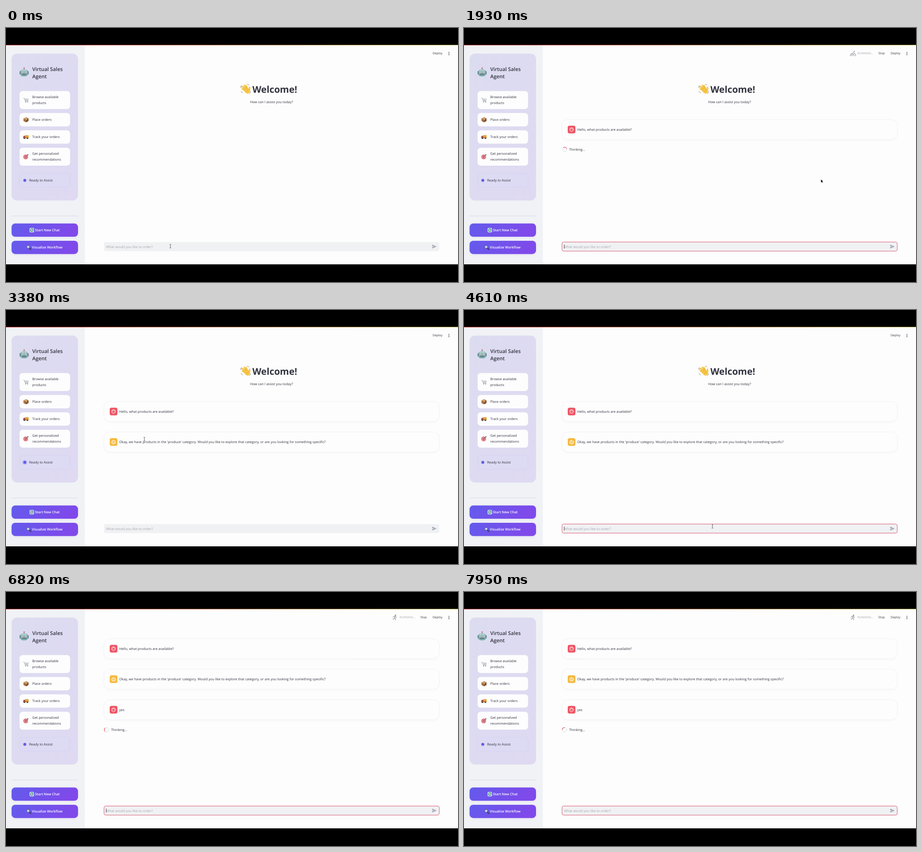
An HTML page that plays this animation: 998 by 561 pixels, repeating every 7990 ms.

```html
<!DOCTYPE html>
<html lang="en">
<head>
<meta charset="utf-8">
<title>Virtual Sales Agent</title>
<style>
  html, body { margin: 0; width: 100%; height: 100%; overflow: hidden; background: #000; }
  svg { display: block; width: 100vw; height: 100vh; }
  text { font: 7.44px "Open Sans", "Noto Sans", sans-serif; fill: #31333f; text-rendering: geometricPrecision; white-space: pre; }
  .title { font-size: 11.3px; font-weight: 600; }
  .hero { font-size: 20.45px; font-weight: 700; }
  .btn { font-size: 7.5px; font-weight: 600; fill: #fff; }
  .bar { font-size: 6.65px; }
  .line { fill: none; stroke-linecap: round; stroke-linejoin: round; }
</style>
</head>
<body>
<svg viewBox="0 0 998 561" preserveAspectRatio="none">
  <defs>
    <linearGradient id="rainbow"><stop stop-color="#ff4b4b"/><stop offset="1" stop-color="#fffd80"/></linearGradient>
    <linearGradient id="panel" x2="1" y2="1"><stop stop-color="#dcdcf0"/><stop offset="1" stop-color="#dfd9f2"/></linearGradient>
    <linearGradient id="violet" x2="1" y2=".2"><stop stop-color="#635bec"/><stop offset="1" stop-color="#8049ea"/></linearGradient>
    <filter id="soft" x="-10%" y="-30%" width="120%" height="180%"><feGaussianBlur stdDeviation="2.5"/></filter>
    <clipPath id="page"><rect x="174" y="38" width="824" height="484"/></clipPath>

    <g id="robot">
      <path d="M10 2v4" stroke="#7d8f96" stroke-width="1.2"/><circle cx="10" cy="2" r="1.4" fill="#c9665c"/>
      <path d="M0 10.5q0-2 2-2h16q2 0 2 2v4q0 2-2 2H2q-2 0-2-2z" fill="#5d868b"/>
      <path d="M2 10q0-5 8-5t8 5v6q0 4.5-8 4.500T2 16z" fill="#82b0b3"/>
      <path d="M4 8q1-2.300 6-2.300T16 8z" fill="#b3d2d2"/>
      <circle cx="6.600" cy="10.500" r="2.200" fill="#eaf4ef"/><circle cx="13.400" cy="10.500" r="2.200" fill="#eaf4ef"/>
      <circle cx="6.600" cy="10.500" r="1.100" fill="#3d5257"/><circle cx="13.400" cy="10.500" r="1.100" fill="#3d5257"/>
      <path d="M9 13.400l1-1.800 1 1.800z" fill="#d0604f"/><rect x="5.500" y="14.800" width="9" height="2.700" rx="1.200" fill="#3e5157"/>
      <path d="M7.700 14.800v2.700M10 14.800v2.700M12.300 14.800v2.700" stroke="#dfe9e6" stroke-width=".7"/>
    </g>
    <g id="cart">
      <path class="line" d="M.6 1.800h1.800l2.200 6.800h6" stroke="#8b9197" stroke-width=".8"/>
      <path d="M3 3.300h8.800l-1.300 4H4.300z" fill="#dfe2e5" stroke="#a1a7ad" stroke-width=".5"/>
      <path d="M5.500 3.300l.6 4M7.700 3.300v4M9.900 3.300l-.6 4" stroke="#a1a7ad" stroke-width=".5"/>
      <circle cx="5.400" cy="10.300" r=".9" fill="#5d6268"/><circle cx="10" cy="10.300" r=".9" fill="#5d6268"/>
    </g>
    <g id="box">
      <path d="M.6 3.200L6.500.6l5 2.400v6L6 11.800.6 9z" fill="#a87142"/><path d="M6 5.400l5.500-2.400v6L6 11.800z" fill="#7c4e2b"/>
      <path d="M.6 3.200L6.500.6l5 2.400L6 5.400z" fill="#c98f5a"/><path d="M3 2.200l5.400 2.400v2l-1.700.8v-2L1.700 2.800z" fill="#e4c08f"/>
    </g>
    <g id="truck">
      <rect x="4.600" y="2" width="7.400" height="6.200" rx=".6" fill="#e0a238"/><path d="M0 8.400V5.600l1.300-2.400h3.500v5.200z" fill="#da4a39"/>
      <path d="M.8 5.400l.9-1.500h1.600v1.500z" fill="#50656f"/><path d="M.2 8.300H12" stroke="#6b4b3a"/>
      <circle cx="2.600" cy="9" r="1.400" fill="#33363b"/><circle cx="9.300" cy="9" r="1.400" fill="#33363b"/>
    </g>
    <g id="dart">
      <circle cx="5.400" cy="6.600" r="5" fill="#cf3a44"/><circle cx="5.400" cy="6.600" r="3.700" fill="#f3e6e6"/>
      <circle cx="5.400" cy="6.600" r="2.700" fill="#cf3a44"/><circle cx="5.400" cy="6.600" r="1" fill="#f6eeee"/>
      <path d="M5.400 6.600l4.400-4.400" stroke="#4c5560"/><path d="M8.800 3l.2-2L10.600 0l.2 1.400 1.400.2-1.200 1.500z" fill="#58707f"/>
    </g>
    <g id="wave" class="line">
      <path d="M10 13L17 10.500l3.500 4q.5 6-3.500 7-3 .5-7-5z" fill="#f7c644" stroke="#f7c644" stroke-width="2"/>
      <g stroke="#f7c644" stroke-width="3.100">
        <path d="M10.500 16L4.500 11.800M11.500 13.500L5.300 6.800M14 11.800L9 4.200M16.500 11.500L13 4.600M20 15.500Q21.800 12 20.600 8.400"/>
      </g>
      <path d="M6 10.200l4.500 4M8 7.200l4.700 5.300M11.800 5.800l3.400 5.400M14 18q1.800-4.200 5-4" stroke="#d99a2b" stroke-width=".7"/>
      <path d="M1 8.800q0-2.900 2-4.600M2.900 9q.1-1.400.9-2.400M15.800 1.600q2.400.2 3.800 2.100M2 17q.8 2.600 3.600 4M22.800 17.500q.2 3-2.400 5.200" stroke="#8d7b66" stroke-width=".9"/>
    </g>
    <g id="cycle">
      <rect width="10" height="10" rx="2.500" fill="#cfdcea"/>
      <path class="line" d="M2.200 4.700a2.900 2.900 0 0 1 5.200-1.400M7.800 5.300a2.900 2.900 0 0 1-5.200 1.400" stroke="#3f8a86" stroke-width="1.400"/>
      <path d="M8.400 1.700v2.600H5.800zM1.600 8.300V5.700h2.600z" fill="#3f8a86"/>
    </g>
    <g id="lens">
      <path class="line" d="M6.500 6.500l3.300 3.300" stroke="#292b3a" stroke-width="1.700"/>
      <circle cx="4" cy="4" r="3.300" fill="#b9d4ec" stroke="#4e5667"/>
    </g>
    <g id="user">
      <rect width="17" height="17" rx="4" fill="#ef5666"/><circle class="line" cx="8.500" cy="8.600" r="4.100" stroke="#fff"/>
      <path class="line" d="M4.700 7.700q2.600 0 3.600-2.600 1.200 2.300 4.100 2.300" stroke="#fff" stroke-width=".9"/>
      <circle cx="7" cy="9.700" r=".6" fill="#fff"/><circle cx="10" cy="9.700" r=".6" fill="#fff"/>
    </g>
    <g id="bot">
      <rect width="17" height="17" rx="4" fill="#f5ba43"/><rect class="line" x="5" y="6" width="7" height="6.400" rx=".8" stroke="#fff"/>
      <path class="line" d="M8.500 6V4.200M4 8.500v1.600M13 8.500v1.600M7 10.800h3" stroke="#fff"/>
      <circle cx="7" cy="8.500" r=".7" fill="#fff"/><circle cx="10" cy="8.500" r=".7" fill="#fff"/>
    </g>
    <g id="bike" class="line" stroke="#8b8d96" stroke-width=".9">
      <circle cx="3" cy="9.300" r="2.400"/><circle cx="10.600" cy="9.300" r="2.400"/>
      <path d="M3 9.300l2.400-3.600 2.200 1.700v2.300M5.400 5.700l2.500-1.800 1.400 1.700h1.700"/><circle cx="9.300" cy="1.800" r="1"/>
    </g>
    <g id="runner" class="line" stroke="#8b8d96" stroke-width="1.100">
      <circle cx="8" cy="1.600" r="1" fill="#8b8d96"/>
      <path d="M2.800 5.800l1.500-2 2.900-.3-1 3.500 2 1.800v3M6.200 7l-1 2.200-3 .7M7.200 3.500l1.300 2 2 .4"/>
    </g>
  </defs>

  <rect width="998" height="561"/>
  <rect y="38" width="998" height="484" fill="#fdfdfd"/>
  <g clip-path="url(#page)"><g id="feed"></g></g>
  <rect x="174" y="38" width="824" height="31" fill="#fdfdfd"/>
  <g id="running">
    <use id="sport" x="852" y="50"/>
    <text class="bar" x="869" y="58.400" style="font-size:6.470px;fill:#a5a6ae">RUNNING...</text>
    <text class="bar" x="915" y="58.400">Stop</text>
  </g>
  <text class="bar" x="942" y="58.400">Deploy</text>
  <g fill="#31333f"><circle cx="978" cy="53.600" r=".9"/><circle cx="978" cy="56.300" r=".9"/><circle cx="978" cy="59" r=".9"/></g>
  <g id="side"></g>
  <rect y="37.300" width="998" height="1.100" fill="url(#rainbow)" opacity=".8"/>

  <rect id="field" x="216.400" width="740.200" rx="4" fill="#f0f1f3"/>
  <text id="entry" x="221"></text>
  <rect id="caret" width=".9" height="9" fill="#31333f"/>
  <path id="send" d="M941 478.500l10 4.300-10 4.300v-3.400l5.500-.9-5.500-.9z"/>
  <path id="beam" class="line" stroke="#44464d" stroke-width=".8" d="M-1.400-4q1.400 0 1.400 1 0-1 1.400-1M0-3v6M-1.400 4q1.400 0 1.400-1 0 1 1.400 1"/>
  <path id="arrow" d="M0 0v7.600l1.800-1.600 1.200 2.700 1.200-.6-1.100-2.500h2.300z" fill="#000" stroke="#fff" stroke-width=".5"/>
</svg>
<script>
const LOOP = 7990;
const $ = id => document.getElementById(id);
const rect = (x, y, w, h, r, attrs) => `<rect x="${x}" y="${y}" width="${w}" height="${h}" rx="${r}" ${attrs}/>`;
const label = (x, y, s, cls = '') => `<text x="${x}" y="${y}" class="${cls}">${s}</text>`;
const icon = (id, x, y) => `<use href="#${id}" x="${x}" y="${y}"/>`;
const show = (id, on) => $(id).setAttribute('visibility', on ? 'visible' : 'hidden');
const clamp = v => Math.max(0, Math.min(1, v));
const ease = v => v * v * (3 - 2 * v);

const HELLO = 'Hello, what products are available?';
const REPLY = "Okay, we have products in the 'produce' category. Would you like to explore that category, or are you looking for something specific?";
const T = { focus: 130, type: 190, typed: 880, ask: 1300, reply: 2600, blur: 3000, refocus: 4250, type2: 5150, typed2: 5500, ask2: 5850 };

function card(y, h, name, lines) {
  const mid = y + h / 2;
  const first = mid + 2.6 - (lines.length - 1) * 6.4;
  return rect(30, y, 111.5, h, 7, 'fill="#fdfdfe"') + icon(name, 38, mid - 6) +
    lines.map((s, i) => label(58, first + i * 12.8, s)).join('');
}

function button(y, name, ix, tx, s) {
  return rect(13, y + 1, 145, 29, 8, 'fill="#7a55e0" opacity=".16" filter="url(#soft)"') +
    rect(12.3, y, 146.7, 29.3, 8, 'fill="url(#violet)"') + icon(name, ix, y + 9.6) + label(tx, y + 17.3, s, 'btn');
}

function message(id, y, who, s) {
  return `<g id="${id}">` + rect(217, y + 1.5, 739, 44, 13, 'fill="#dcdce8" opacity=".22" filter="url(#soft)"') +
    rect(216.3, y, 740.4, 44, 13, 'fill="#fdfdfd" stroke="#eeeff4" stroke-width=".8"') +
    icon(who, 229, y + 13.4) + label(250, y + 24.4, s) + '</g>';
}

$('side').innerHTML =
  rect(0, 38, 174, 484, 0, 'fill="#f0f2f5"') +
  rect(12.3, 56.5, 146.7, 324.5, 12, 'fill="url(#panel)"') +
  icon('robot', 30, 86.5) + label(58, 95.3, 'Virtual Sales', 'title') + label(58, 110.5, 'Agent', 'title') +
  card(139.3, 39.7, 'cart', ['Browse available', 'products']) +
  card(187.8, 29.5, 'box', ['Place orders']) +
  card(226, 29.5, 'truck', ['Track your orders']) +
  card(264.5, 39.5, 'dart', ['Get personalized', 'recommendations']) +
  rect(30, 321, 111.5, 31, 7, 'fill="#dddaf3" stroke="#d3d0f3" stroke-width=".8"') +
  '<circle id="halo" cx="41.5" cy="336.4" fill="#6366f1"/><circle cx="41.5" cy="336.4" r="3.2" fill="#615ce6"/>' +
  label(51, 339, 'Ready to Assist') +
  rect(12.3, 414.6, 146.7, .9, 0, 'fill="#d3d6e2"') +
  button(431.8, 'cycle', 52, 64, 'Start New Chat') + button(469.9, 'lens', 45, 57, 'Visualize Workflow');

$('feed').innerHTML =
  icon('wave', 517, 122.5) + label(544, 142.5, 'Welcome!', 'hero') + label(539, 166.4, 'How can I assist you today?') +
  message('m1', 202.3, 'user', HELLO) + message('m2', 269.6, 'bot', REPLY) + message('m3', 337.2, 'user', 'yes') +
  '<g id="think"><circle class="line" cx="222" cy="0" r="5" stroke="#dcdde3"/>' +
  '<path id="arc" class="line" d="M218.46-3.54A5 5 0 0 1 225.54-3.54" stroke="#e2505e" stroke-width="1.2"/>' +
  label(232, 2.7, 'Thinking...') + '</g>';

// Pointer stops: time, x, y
const stops = [[0, 363, 482], [300, 363, 482], [850, 355, 482], [1350, 355, 482], [1800, 788, 334],
  [2350, 788, 334], [3050, 305.5, 285], [3550, 305.5, 285], [4300, 548.5, 478], [LOOP, 548.5, 478]];

function pointer(t) {
  const i = stops.findIndex(s => s[0] > t);
  const [a, b] = [stops[i - 1], stops[i]];
  const k = ease((t - a[0]) / (b[0] - a[0]));
  return [a[1] + (b[1] - a[1]) * k, a[2] + (b[2] - a[2]) * k];
}

function typed(t) {
  const part = (s, from, to) => s.slice(0, Math.ceil(clamp((t - from) / (to - from)) * s.length));
  if (t < T.ask) return part(HELLO, T.type, T.typed);
  return t < T.ask2 ? part('yes', T.type2, T.typed2) : '';
}

function draw(t) {
  const first = t >= T.ask && t < T.reply, second = t >= T.ask2;
  const busy = first || second;
  const focus = t >= T.focus && !(t >= T.blur && t < T.refocus);

  show('m1', t >= T.ask);
  show('m2', t >= T.reply);
  show('m3', second);
  show('think', busy);
  $('think').setAttribute('transform', `translate(0 ${second ? 403.3 : 268.2})`);
  const turn = (t - (second ? 7070 : 1875)) * .36;
  $('arc').setAttribute('transform', `rotate(${turn} 222 0)`);
  $('feed').setAttribute('transform', `translate(0 ${-99 * ease(clamp((t - T.ask2) / 200))})`);

  show('running', busy);
  const bike = Math.floor(t / 400) % 2 === 0;
  $('sport').setAttribute('href', bike ? '#bike' : '#runner');

  const glow = Math.max(0, 1 - Math.abs(t % 800 / 800 - .25) / .16);
  $('halo').setAttribute('r', 3.2 + 2.6 * glow);
  $('halo').setAttribute('opacity', .3 * glow);

  const text = typed(t), entry = $('entry'), field = $('field');
  const top = text ? 460.4 : 472.7;
  field.setAttribute('y', top);
  field.setAttribute('height', 492.8 - top);
  field.setAttribute('stroke', focus ? '#d9566e' : 'none');
  entry.textContent = text || 'What would you like to order?';
  entry.setAttribute('y', text ? 484.6 : 485.5);
  entry.style.fill = text ? '#31333f' : '#a4a6ae';
  show('caret', focus && t % 900 < 600);
  $('caret').setAttribute('x', text ? 221.4 + entry.getComputedTextLength() : 220.8);
  $('caret').setAttribute('y', text ? 477.3 : 478.2);
  $('send').setAttribute('fill', text ? '#454a57' : '#a3a8b4');

  const [x, y] = pointer(t);
  const beam = y > 472 || (y < 300 && x < 706);
  const visible = t < T.type2;
  show('beam', visible && beam);
  show('arrow', visible && !beam);
  for (const id of ['beam', 'arrow']) $(id).setAttribute('transform', `translate(${x} ${y})`);
}

const start = performance.now();
function tick() {
  draw((performance.now() - start) % LOOP);
  requestAnimationFrame(tick);
}
tick();
</script>
</body>
</html>
```
